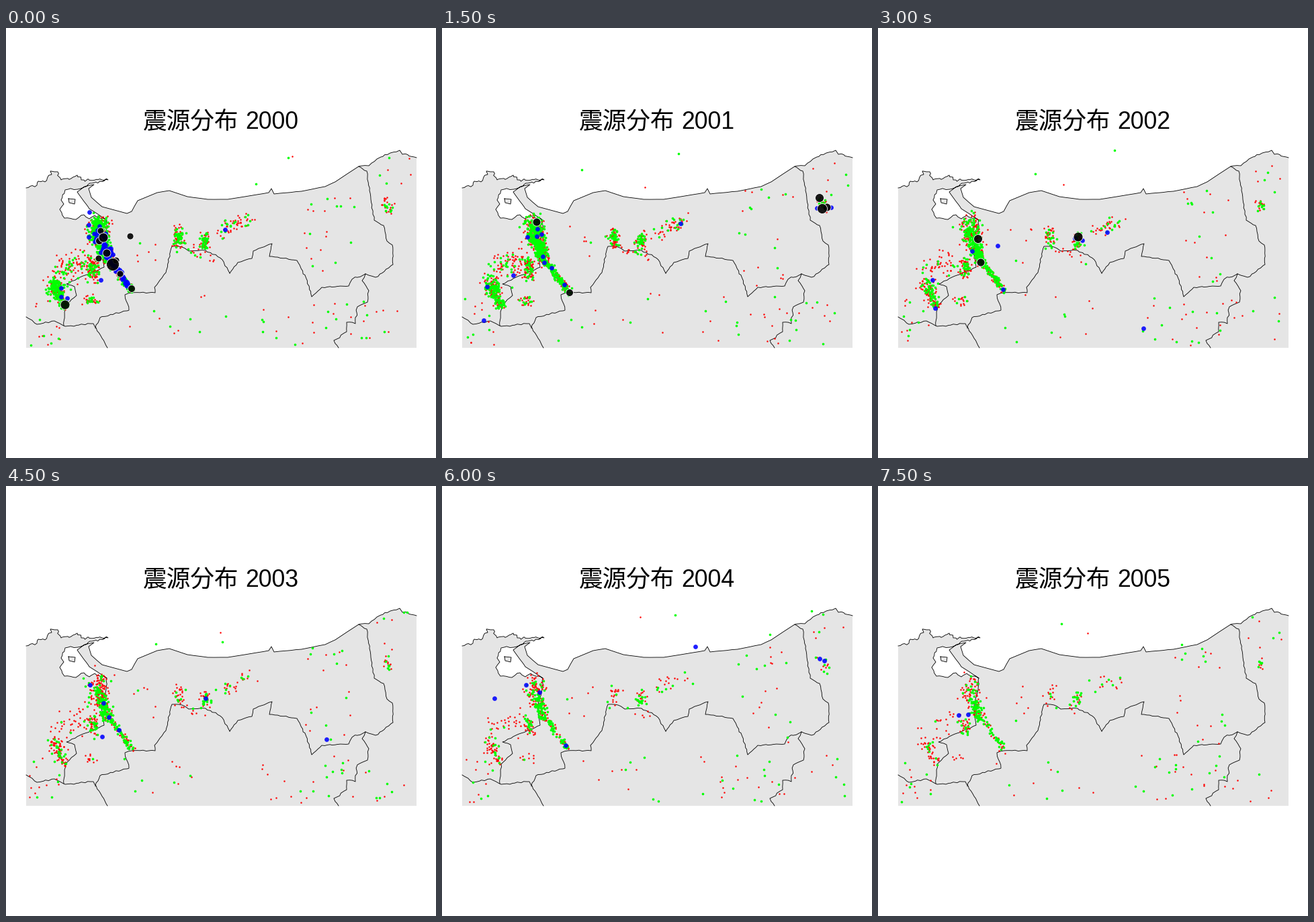
Recreate the animation shown at these times as a matplotlib script. Size 640 by 640 pixels, loop 8 s.

```python
import matplotlib.pyplot as plt
import numpy as np
from matplotlib.animation import FuncAnimation

DPI = 100
PX = 72 / DPI
STEP_MS, STEPS, STEPS_PER_YEAR = 500, 16, 3
FIRST_YEAR = 2000
LEFT, RIGHT, BOTTOM = 30, 611, 476

shape_rng = np.random.default_rng(7)


def rough(points, amp=0.6, step=4):
    """Subdivide a path and shake the new points a little."""
    out = [points[0]]
    for (x0, y0), (x1, y1) in zip(points, points[1:]):
        n = max(1, int(np.hypot(x1 - x0, y1 - y0) / step))
        for k in range(1, n):
            dx, dy = shape_rng.normal(0, amp, 2)
            out.append((x0 + (x1 - x0) * k / n + dx, y0 + (y1 - y0) * k / n + dy))
        out.append((x1, y1))
    return out


# Coast, west to east
peninsula = [(30, 238), (46, 234), (48, 228), (58, 229), (68, 218), (66, 213),
             (77, 214), (82, 226), (97, 224), (106, 219), (112, 226), (152, 226),
             (128, 231), (107, 240)]
lagoon = [(107, 240), (88, 241), (82, 256), (86, 262), (80, 270), (87, 283),
          (104, 285), (116, 278), (124, 284), (132, 279), (150, 286)]
spit = [(150, 286), (124, 269), (106, 244), (117, 236), (131, 233)]
bay = [(131, 233), (123, 239), (127, 252), (143, 266), (180, 276), (187, 273),
       (196, 257), (225, 245), (243, 242), (270, 251), (300, 255), (330, 255),
       (391, 245), (395, 239), (399, 247), (440, 243), (475, 236), (490, 229),
       (508, 217), (525, 206)]
east_coast = [(525, 206), (540, 205), (552, 195), (572, 186), (586, 182),
              (590, 188), (611, 193)]
islet = [(93, 254), (103, 255), (102, 262), (94, 260), (93, 254)]

# Inland borders
west_line = [(150, 286), (149, 303), (142, 332), (146, 356), (110, 371), (90, 381),
             (102, 385), (105, 398), (88, 414), (86, 443)]
south_line = [(30, 430), (46, 441), (72, 436), (88, 444), (130, 440), (151, 476)]
ridge_west = [(133, 447), (140, 431), (183, 420), (177, 397), (187, 394), (222, 394),
              (221, 386), (238, 364), (247, 325), (262, 326), (272, 332), (297, 331),
              (322, 345), (333, 365)]
ridge_east = [(333, 365), (345, 349), (366, 343), (368, 332), (396, 321), (392, 340),
              (433, 346), (447, 373), (455, 400), (470, 386), (510, 384), (515, 374),
              (535, 366)]
east_line = [(535, 366), (550, 371), (576, 352), (575, 323), (567, 317), (562, 294),
             (548, 286), (543, 255), (537, 213), (525, 206)]
south_east_line = [(535, 366), (530, 376), (540, 391), (538, 408), (523, 415),
                   (520, 440), (507, 438), (507, 452), (488, 465), (495, 476)]

# Swarms: segment ends, spread, red and green counts, speed at which green fades
SWARMS = [
    (137, 288, 140, 318, 7, 200, 250, 1.7),
    (143, 318, 151, 345, 4, 110, 210, 0.8),
    (154, 346, 188, 392, 2.3, 85, 130, 0.9),
    (129, 345, 130, 370, 4, 75, 32, 0.5),
    (70, 380, 77, 392, 6, 70, 100, 2),
    (75, 392, 88, 415, 3, 60, 65, 1.7),
    (75, 358, 125, 345, 10, 75, 35, 2),
    (117, 404, 132, 407, 4, 22, 12, 2),
    (256, 300, 256, 322, 4, 45, 40, 1.8),
    (297, 308, 295, 325, 4, 40, 28, 0.4),
    (320, 302, 362, 285, 6, 38, 16, 0.6),
    (250, 322, 310, 345, 4, 16, 6, 1),
    (564, 255, 573, 272, 4, 18, 9, 0.3),
]
RED_LEVEL = [1, 0.95, 0.65, 0.55, 0.38, 0.27]
GREEN_LEVEL = [1, 0.85, 0.55, 0.33, 0.25, 0.19]

# Sparse background: box, red and green counts
ZONES = [
    (440, 240, 525, 275, 5, 5),
    (440, 300, 520, 385, 7, 4),
    (380, 400, 600, 472, 18, 14),
    (170, 395, 330, 470, 6, 5),
    (545, 185, 605, 250, 4, 3),
    (200, 180, 500, 240, 1, 2),
    (34, 400, 80, 472, 10, 6),
    (185, 290, 230, 350, 5, 1),
]


def along(rng, x0, y0, x1, y1, spread, n):
    t = rng.random((n, 1))
    xy = np.array([x0, y0]) + t * np.array([x1 - x0, y1 - y0])
    xy = xy + rng.normal(0, spread, (n, 2))
    return np.clip(xy, (33, 170), (607, 473))


def quakes(k):
    """Small events of year k as red and green point clouds."""
    rng = np.random.default_rng(FIRST_YEAR + k)
    red, green = [], []
    for *line, n_red, n_green, fade in SWARMS:
        red.append(along(rng, *line, round(n_red * RED_LEVEL[k])))
        green.append(along(rng, *line, round(n_green * GREEN_LEVEL[k] ** fade)))
    for x0, y0, x1, y1, n_red, n_green in ZONES:
        red.append(rng.uniform((x0, y0), (x1, y1), (n_red, 2)))
        green.append(rng.uniform((x0, y0), (x1, y1), (n_green, 2)))
    return np.vstack(red), np.vstack(green)


years = []


def add_year(blue, black=()):
    red, green = quakes(len(years))
    years.append((red, green, np.array(blue, float),
                  np.array(black, float).reshape(-1, 3)))


blue_rng = np.random.default_rng(3)
fault = np.vstack([along(blue_rng, 137, 298, 153, 346, 4.5, 45),
                   along(blue_rng, 155, 346, 183, 383, 1.7, 35)])
add_year([(124, 274), (123, 293), (123, 311), (141, 375), (82, 387), (82, 400),
          (91, 402), (326, 300), *fault],
         [(141, 302, 5), (139, 317, 5.5), (145, 312, 7), (150, 335, 6),
          (138, 343, 5), (164, 346, 5), (159, 352, 9.5), (170, 366, 5),
          (187, 388, 5.5), (88, 412, 7), (185, 310, 5)])
add_year([(127, 311), (142, 299), (141, 310), (148, 307), (150, 340), (152, 349),
          (163, 357), (182, 382), (106, 368), (67, 385), (62, 435), (355, 291),
          (558, 268), (579, 267)],
         [(141, 289, 6), (190, 394, 5.5), (562, 253, 6.5), (573, 267, 6),
          (566, 269, 7.5)])
add_year([(178, 324), (140, 332), (81, 375), (85, 417), (186, 389), (341, 304),
          (395, 447), (304, 316), (293, 313)],
         [(149, 314, 6.5), (153, 349, 6), (298, 311, 7)])
add_year([(125, 296), (145, 323), (153, 344), (168, 363), (143, 373), (297, 316),
          (477, 377)])
add_year([(377, 239), (78, 316), (125, 296), (145, 307), (184, 386), (562, 257),
          (569, 260)])
add_year([(120, 341), (134, 340)])

fig = plt.figure(figsize=(640 / DPI, 640 / DPI), dpi=DPI, facecolor="white")
ax = fig.add_axes([0, 0, 1, 1])
ax.set(xlim=(0, 640), ylim=(640, 0))
ax.axis("off")

LAND = "#e5e5e5"
coast = (rough(peninsula, 1.1, 3) + rough(lagoon, 0.8) + rough(spit, 0.2)
         + rough(bay, 0.1, 8) + rough(east_coast, 0.8))
borders = [west_line, south_line, ridge_west, ridge_east, east_line, south_east_line]
ax.fill(*zip(*coast, (RIGHT, BOTTOM), (LEFT, BOTTOM)), color=LAND, lw=0, zorder=1)
ax.fill(*zip(*islet), color=LAND, lw=0, zorder=1)
for path in [coast, islet] + [rough(b) for b in borders]:
    ax.plot(*zip(*path), color="black", lw=0.85 * PX, zorder=2)


def area(radius):
    return (2 * radius * PX) ** 2


def dots(color, radius, z, alpha=1):
    return ax.scatter([], [], s=area(radius), color=color, lw=0, alpha=alpha, zorder=z)


red_dots = dots("#ff0000", 1.25, 3)
green_dots = dots("#00ff00", 1.8, 4)
blue_dots = dots("#0000ff", 3.4, 5, alpha=0.88)
black_dots = ax.scatter([], [], facecolor=(0, 0, 0, 0.9), edgecolor="white",
                        lw=0.8 * PX, zorder=6)

SIZE = 35.6 * PX
ax.text(203.5, 149.5, "震源分布", family="Noto Sans CJK JP", size=SIZE, va="baseline")
year_text = ax.text(356.5, 149.5, "", family="Liberation Sans", size=SIZE, va="baseline")


def draw(i):
    k = i // STEPS_PER_YEAR
    red, green, blue, black = years[k]
    red_dots.set_offsets(red)
    green_dots.set_offsets(green)
    blue_dots.set_offsets(blue)
    black_dots.set_offsets(black[:, :2])
    black_dots.set_sizes(area(black[:, 2]))
    year_text.set_text(str(FIRST_YEAR + k))
    return red_dots, green_dots, blue_dots, black_dots, year_text


anim = FuncAnimation(fig, draw, frames=STEPS, interval=STEP_MS, repeat=True,
                     repeat_delay=0, init_func=lambda: draw(0))
plt.show()
```
